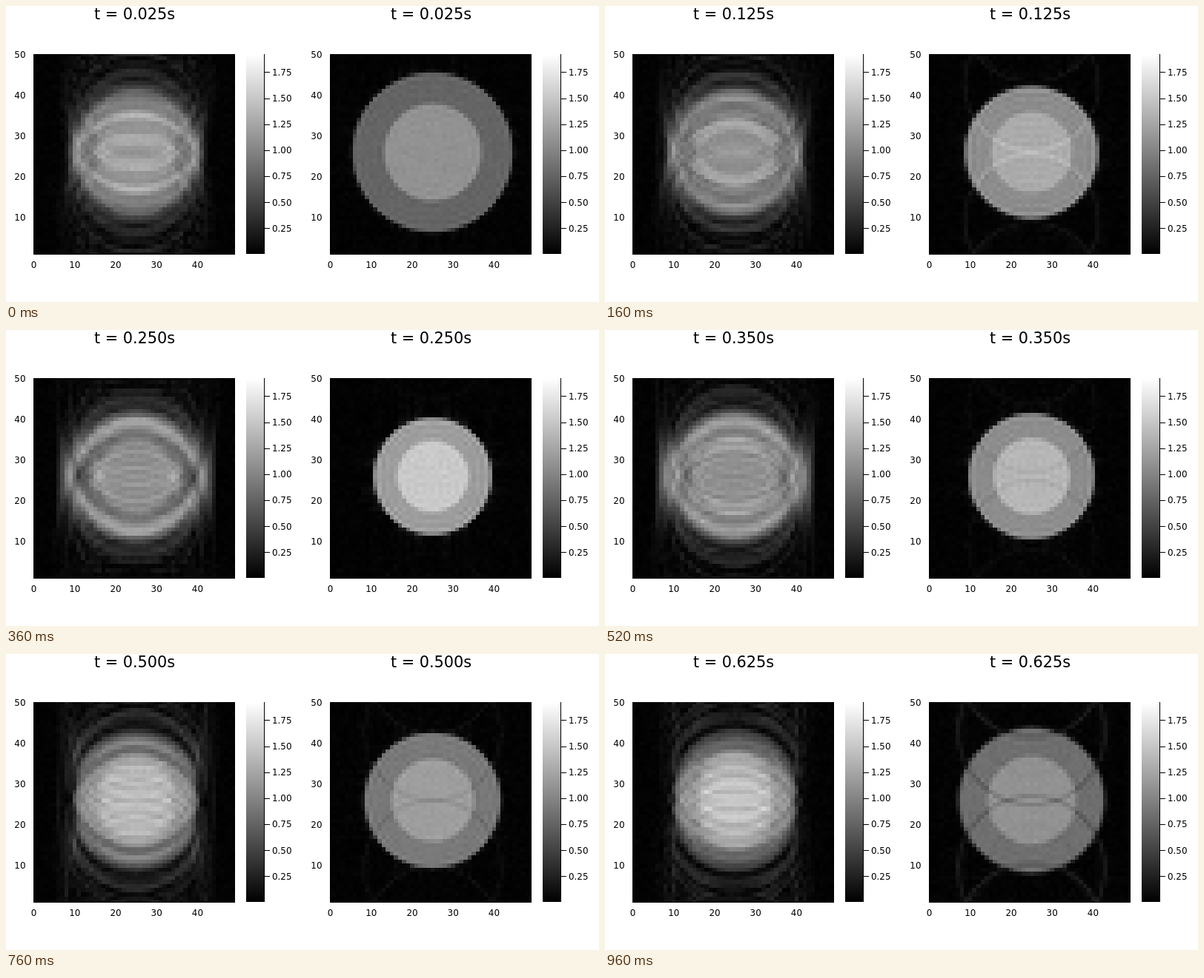
Animation of 800x400 px, one loop 1000 ms. Source, as an HTML page with a canvas:

```html
<!DOCTYPE html>
<html lang="en">
<head>
<meta charset="utf-8">
<title>Beating phantom</title>
<style>
  html, body { margin: 0; width: 100%; height: 100%; overflow: hidden; background: #fff; }
  canvas, svg { position: absolute; left: 0; top: 0; display: block; }
  text { font-family: "DejaVu Sans", sans-serif; font-size: 11.9px; fill: #000; }
  .title { font-size: 20.8px; text-anchor: middle; }
  .mid { text-anchor: middle; }
  .end { text-anchor: end; }
  path { stroke: #000; stroke-width: 1; fill: none; }
</style>
</head>
<body>
<canvas id="view" width="800" height="400"></canvas>
<svg id="axes" width="800" height="400" viewBox="0 0 800 400">
  <defs>
    <linearGradient id="gray" x1="0" y1="1" x2="0" y2="0">
      <stop offset="0" stop-color="#000"/>
      <stop offset="1" stop-color="#fff"/>
    </linearGradient>
  </defs>
</svg>
<script>
const N = 50, H = N / 2, CELL = 270.6 / 49, X0 = 37.5, Y0 = 65.2;
const STEPS = 25, FRAME_MS = 40, DT = 0.025;

// Axes, labels and colour bars
function panel(dx) {
  let s = `<g transform="translate(${dx} 0)"><text class="title" x="173.5" y="18"></text>`;
  s += '<path d="M37.5 65V335.5H308.5"/>';
  for (let v = 0; v <= 40; v += 10)
    s += `<text class="mid" x="${X0 + v * CELL}" y="353.5">${v}</text>`;
  for (let v = 10; v <= 50; v += 10)
    s += `<text class="end" x="26.5" y="${69.5 + (50 - v) * CELL}">${v}</text>`;
  s += '<rect x="324" y="65" width="24" height="270" fill="url(#gray)"/><path d="M348.5 65V335"/>';
  for (let i = 1; i <= 7; i++) {
    const y = 335.2 - i * 35.1;
    s += `<path d="M348 ${Math.round(y) + 0.5}h8"/><text x="359" y="${y + 4.5}">${(i / 4).toFixed(2)}</text>`;
  }
  return s + '</g>';
}
document.getElementById('axes').insertAdjacentHTML('beforeend', panel(0) + panel(400));
const titles = document.querySelectorAll('.title');

// One heartbeat: time, outer radius, ring gray, extra gray of the core
const BEAT = 0.8;
const keys = [
  [0, 19.8, 98, 44], [0.025, 19.65, 100, 45], [0.07, 18.6, 116, 38],
  [0.125, 16.5, 139, 30], [0.18, 15.1, 151, 37], [0.25, 14.4, 158, 44],
  [0.3, 14.75, 150, 44], [0.35, 15.35, 142, 43], [0.4, 15.7, 135, 39],
  [0.5, 16.5, 122, 38], [0.625, 17.4, 113, 32], [0.7, 18.4, 106, 38]
];

function keyAt(i) {
  const n = keys.length, turn = Math.floor(i / n), k = keys[i - turn * n];
  return [k[0] + turn * BEAT, k[1], k[2], k[3]];
}

function heart(t) {
  let i = keys.length - 1;
  while (keys[i][0] > t) i--;
  const [a, b, c, d] = [i - 1, i, i + 1, i + 2].map(keyAt);
  const h = c[0] - b[0], u = (t - b[0]) / h;
  return [1, 2, 3].map(j => {
    const m = (c[j] - a[j]) / (c[0] - a[0]) * h, n = (d[j] - b[j]) / (d[0] - b[0]) * h;
    const e = c[j] - b[j];
    return b[j] + u * (m + u * (3 * e - 2 * m - n + u * (m + n - 2 * e)));
  });
}

// Bessel function J1, tabulated from its integral
const J_STEP = 0.05;
const bessel = Float64Array.from({ length: 2000 }, (_, i) => {
  let sum = 0;
  for (let k = 0; k < 128; k++) {
    const a = Math.PI * (k + 0.5) / 128;
    sum += Math.cos(a - i * J_STEP * Math.sin(a));
  }
  return sum / 128;
});

function j1(x) {
  const p = x / J_STEP, i = Math.floor(p);
  return bessel[i] + (bessel[i + 1] - bessel[i]) * (p - i);
}

// Fourier transform of a disc at frequency q
const disc = (r, q) => q ? r * j1(2 * Math.PI * q * r) / q : Math.PI * r * r;

function spectrum(t) {
  const [r, ring, core] = heart(t);
  return Float64Array.from({ length: N * N }, (_, n) => {
    const q = Math.hypot(n % N - H, Math.floor(n / N) - H) / N;
    return ring * disc(r, q) + core * disc(0.605 * r, q);
  });
}

const PHASES = 128;
const spectra = Array.from({ length: PHASES }, (_, i) => spectrum(i / PHASES * BEAT));

function sample(n, t) {
  const p = (t / BEAT % 1) * PHASES, i = Math.floor(p), f = p - i;
  return spectra[i % PHASES][n] * (1 - f) + spectra[(i + 1) % PHASES][n] * f;
}

// Fourier tables, centred on cell 25
const table = f => Float64Array.from({ length: N * N },
  (_, n) => f(2 * Math.PI * (Math.floor(n / N) - H) * (n % N - H) / N));
const C = table(Math.cos), S = table(Math.sin);

// a times b, both N by N
function mul(a, b) {
  const out = new Float64Array(N * N);
  for (let i = 0; i < N; i++)
    for (let k = 0; k < N; k++) {
      const v = a[i * N + k];
      for (let j = 0; j < N; j++) out[i * N + j] += v * b[k * N + j];
    }
  return out;
}

function random(seed) {
  return () => {
    seed = (seed * 1664525 + 1013904223) >>> 0;
    return seed / 4294967296;
  };
}

// Image from frequency samples that were each taken at their own time
function rebuild(timeOf, seed) {
  const g = new Float64Array(N * N);
  for (let n = 0; n < N * N; n++)
    g[n] = sample(n, timeOf(n % N - H, Math.floor(n / N) - H));
  const re = mul(g, C), im = mul(g, S);
  const cr = mul(C, re), si = mul(S, im), ci = mul(C, im), sr = mul(S, re);
  const rnd = random(seed), noise = () => (rnd() + rnd() + rnd() - 1.5) * 4;
  const cv = document.createElement('canvas');
  cv.width = cv.height = N;
  const cx = cv.getContext('2d'), px = cx.createImageData(N, N);
  for (let n = 0; n < N * N; n++) {
    const v = Math.hypot((cr[n] - si[n]) / (N * N) + noise(), (ci[n] + sr[n]) / (N * N) + noise());
    const o = 4 * ((N - 1 - Math.floor(n / N)) * N + n % N);
    px.data[o] = px.data[o + 1] = px.data[o + 2] = v;
    px.data[o + 3] = 255;
  }
  cx.putImageData(px, 0, 0);
  return cv;
}

// Free-running: one line after another over several beats.
// Gated: three interleaved sets of lines that drift apart during the beat.
const LINE = 0.05, DRIFT = 0.05;
const free = t => (kx, ky) => t + (ky + H + (kx + H) / N) * LINE;
const gated = t => (kx, ky) => t * (1 + DRIFT * ((ky + 3 * H) % 3));

const frames = Array.from({ length: STEPS }, (_, i) => {
  const t = (i + 1) * DT;
  return [rebuild(free(t), 2 * i + 7), rebuild(gated(t), 2 * i + 8)];
});

const ctx = document.getElementById('view').getContext('2d');
ctx.imageSmoothingEnabled = false;

function show(i) {
  frames[i].forEach((img, p) => {
    const x = X0 + 400 * p;
    ctx.save();
    ctx.beginPath();
    ctx.rect(x - 0.5, 65, 272, 271);
    ctx.clip();
    ctx.drawImage(img, x - CELL / 2, Y0 - CELL / 2, N * CELL, N * CELL);
    ctx.restore();
    titles[p].textContent = `t = ${((i + 1) * DT).toFixed(3)}s`;
  });
}

let start = null, shown = -1;
function tick(now) {
  if (start === null) start = now;
  const i = Math.floor((now - start) / FRAME_MS) % STEPS;
  if (i !== shown) show(shown = i);
  requestAnimationFrame(tick);
}
show(0);
requestAnimationFrame(tick);
</script>
</body>
</html>
```
